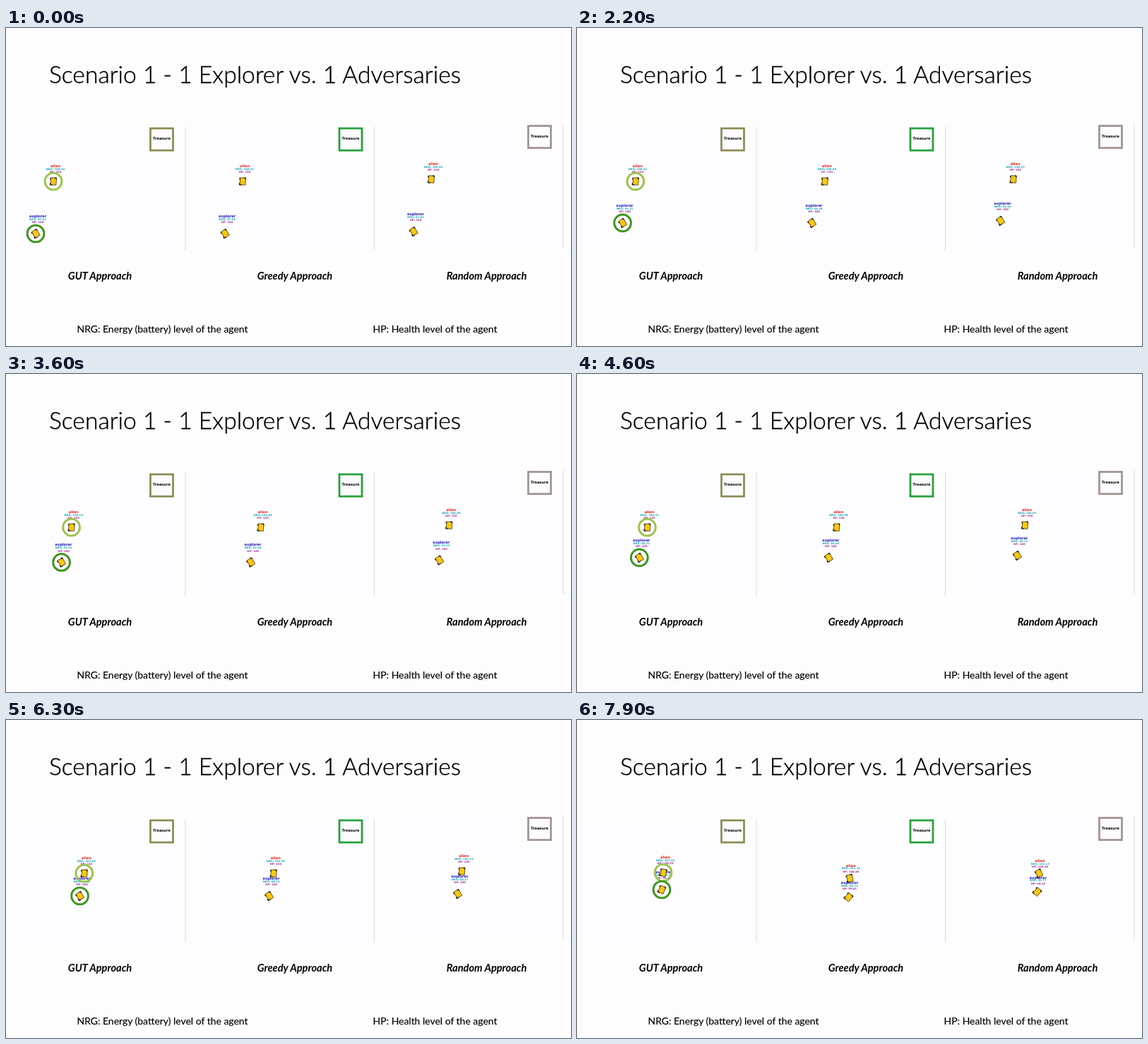
These frames come from a looping animation (800 px wide and 450 px high, 8 s). An HTML page:

```html
<!DOCTYPE html>
<html lang="en">
<head>
<meta charset="utf-8">
<title>Explorer and adversary</title>
<style>
html, body { margin: 0; width: 100%; height: 100%; overflow: hidden; background: #fefdfe; }
svg { display: block; width: 800px; height: 450px; }
text { text-anchor: middle; font-family: Lato, "Open Sans", sans-serif; fill: #000; }
.title { font-size: 33.65px; font-weight: 300; stroke: #000; stroke-width: .4px; }
.note { font-size: 13.95px; stroke: #000; stroke-width: .15px; }
.label { font-size: 14.6px; font-weight: 700; font-style: italic; }
.tag { font-family: "DejaVu Sans", sans-serif; font-weight: 700; font-size: 5.1px; }
.nrg, .hp { font-size: 3.75px; }
.alien { fill: #e0281c; }
.explorer { fill: #1c1cc0; }
.nrg { fill: #22a6bd; }
.hp { fill: #9c3a96; }
</style>
</head>
<body>
<svg id="stage" viewBox="0 0 800 450">
  <text class="title" x="352.5" y="78">Scenario 1 - 1 Explorer vs. 1 Adversaries</text>
  <text class="note" x="221.5" y="430.6">NRG: Energy (battery) level of the agent</text>
  <text class="note" x="607.5" y="430.6">HP: Health level of the agent</text>
</svg>
<script>
const LOOP = 8000, STEP = 100, TURN = 7.1, END = 7.9;
const stage = document.getElementById('stage');

// Each path holds [x, y, angle, tag drop] at the start, at the turn and at the end.
const panels = [
  { name: 'GUT', x: 10, y: 140, labelX: 133, box: '#8b8b50', rings: true,
    alien: { path: [[67, 217, 3, 0], [116, 217, 3, 0], [122, 216, 15, 0]], nrg: 108.34, hp: [150, 150, 149.28] },
    explorer: { path: [[42, 291, -31, 0], [112, 244, -31, 0], [120, 240, 22, 0]], nrg: 97.61, hp: [100, 100, 99.28] } },
  { name: 'Greedy', x: 277.5, y: 140, labelX: 409, box: '#2aa63f', dotted: true,
    alien: { path: [[335, 217, 3, 0], [384, 217, 3, 0], [386, 224, -12, 3.5]], nrg: 108.01, hp: [150, 149.67, 148.85] },
    explorer: { path: [[310, 291, -31, 0], [380, 244, -31, 0], [384.5, 250.5, 40, 4.5]], nrg: 97.58, hp: [100, 99.83, 99.01] } },
  { name: 'Random', x: 545, y: 136.5, labelX: 680.5, box: '#a0928f',
    alien: { path: [[602, 214, 3, 0], [650.5, 214, 3, 0], [654, 217, -25, 4]], nrg: 108.04, hp: [150, 150, 149.49] },
    explorer: { path: [[577, 288, -31, 0], [647, 241, -31, 0], [651.5, 243, 42, 4.5]], nrg: 97.62, hp: [100, 100, 99.35] } }
];

function add(parent, tag, attrs, content = '') {
  const node = document.createElementNS('http://www.w3.org/2000/svg', tag);
  for (const key in attrs) node.setAttribute(key, attrs[key]);
  node.textContent = content;
  parent.appendChild(node);
  return node;
}

function addRobot(parent) {
  const robot = add(parent, 'g', {});
  add(robot, 'rect', { x: -3.6, y: -5, width: 7.8, height: 10, fill: '#f8c812', stroke: '#4a3a10', 'stroke-width': .8 });
  add(robot, 'path', { d: 'M-4.2-4.6v2.4M-4.2 2.6v3M4-5v2', stroke: '#16120a', 'stroke-width': 1.3 });
  add(robot, 'path', { d: 'M-3.6 5.1h2.8M1.6-5.1h2.4', stroke: '#16120a' });
  return robot;
}

function addPanel(p) {
  add(stage, 'rect', { x: p.x, y: p.y, width: 244, height: 175, fill: '#fdfcfe' });
  add(stage, 'rect', { x: p.x + 243.5, y: p.y, width: 1, height: 175, fill: '#dcdadd' });
  const edge = { x: p.x + 194.5, y: p.y + 2, width: 32, height: 31.2, fill: 'none', stroke: p.box, 'stroke-width': 2.7 };
  add(stage, 'rect', edge);
  if (p.dotted) add(stage, 'rect', { ...edge, stroke: '#178a2c', 'stroke-dasharray': '1 2', opacity: .5 });
  add(stage, 'text', { class: 'tag', x: p.x + 210.5, y: p.y + 18.3 }, 'Treasure');
  add(stage, 'text', { class: 'label', x: p.labelX, y: 356 }, p.name + ' Approach');
  const tags = add(stage, 'g', {}), bodies = add(stage, 'g', {});
  for (const kind of ['alien', 'explorer']) {
    const a = p[kind], isAlien = kind === 'alien', top = isAlien ? -20 : -23;
    a.tags = add(tags, 'g', {});
    add(a.tags, 'text', { class: 'tag ' + kind, x: 3, y: top }, kind);
    a.nrgText = add(a.tags, 'text', { class: 'tag nrg', x: 3, y: top + 3.8 });
    a.hpText = add(a.tags, 'text', { class: 'tag hp', x: 3, y: top + 8.3 });
    a.drain = isAlien ? .875 : 1.5;
    a.body = add(bodies, 'g', {});
    if (p.rings) {
      add(a.body, 'circle', { r: 11.9, fill: 'none', stroke: isAlien ? '#9cc34c' : '#3d961d', 'stroke-width': 2.9 });
    }
    a.robot = addRobot(a.body);
  }
}

const mix = (a, b, k) => a + (b - a) * k;

// The approach slows down slightly.
const approach = k => k + .06 * k * (1 - k);

function place(a, t) {
  const late = t > TURN, i = late ? 1 : 0;
  const k = late ? (t - TURN) / (END - TURN) : approach(t / TURN);
  const [x, y, angle, drop] = a.path[i].map((v, n) => mix(v, a.path[i + 1][n], k));
  a.tags.setAttribute('transform', `translate(${x - drop * .35} ${y + drop})`);
  a.body.setAttribute('transform', `translate(${x} ${y})`);
  a.robot.setAttribute('transform', `rotate(${angle})`);
  // Health only drains once the agents are close.
  const near = Math.max(0, (t - 6.8) / (TURN - 6.8));
  const hp = mix(a.hp[i], a.hp[i + 1], late ? k : near);
  a.nrgText.textContent = 'NRG: ' + (a.nrg - a.drain * t).toFixed(2);
  a.hpText.textContent = 'HP: ' + +hp.toFixed(2);
}

function draw() {
  const t = Math.floor(performance.now() % LOOP / STEP) * STEP / 1000;
  for (const p of panels) {
    place(p.alien, t);
    place(p.explorer, t);
  }
  requestAnimationFrame(draw);
}

panels.forEach(addPanel);
draw();
</script>
</body>
</html>
```
